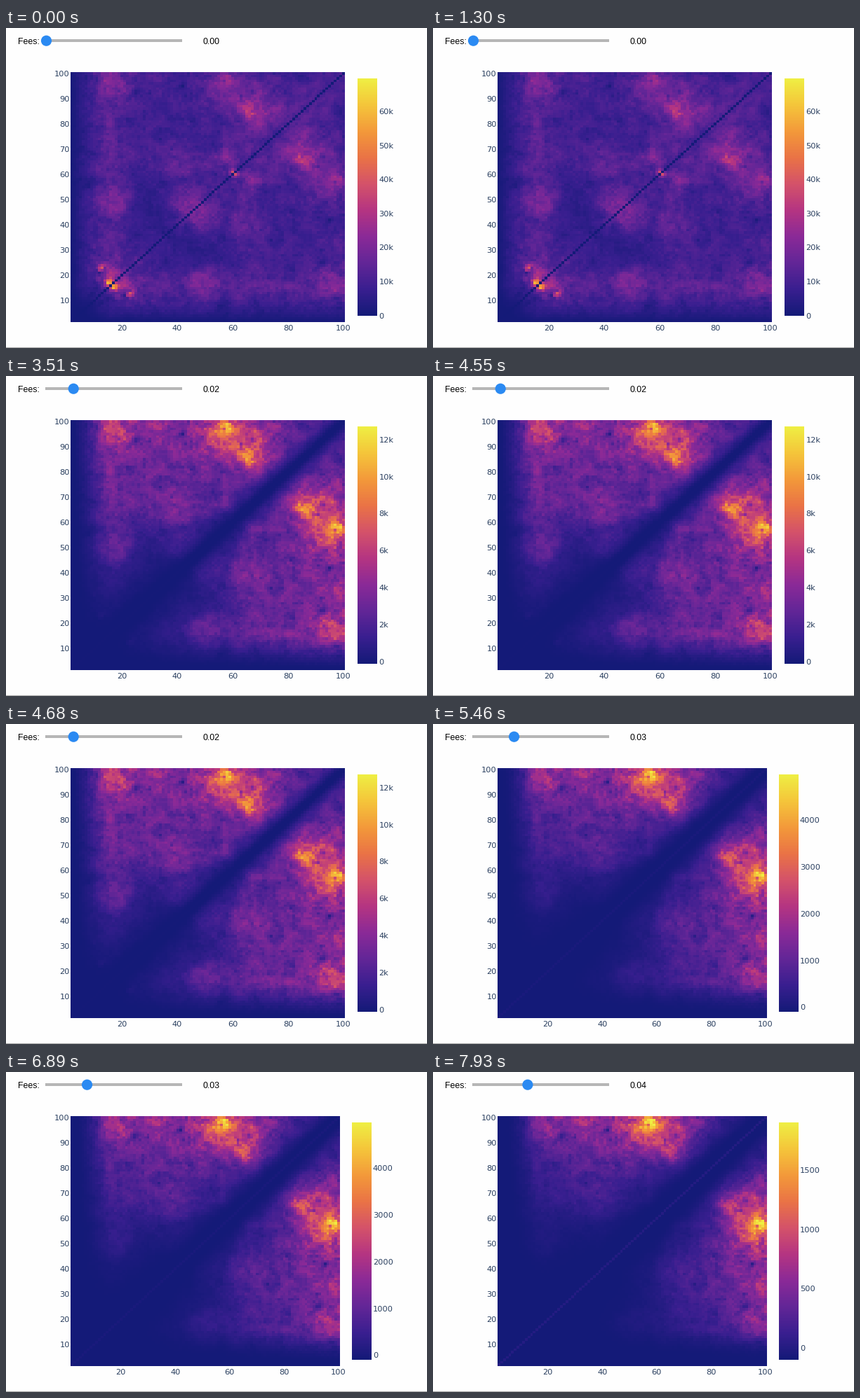
Animation of 600x457 px, one loop 8000 ms. Source, as a matplotlib script:

```python
import numpy as np
import matplotlib.pyplot as plt
from matplotlib.animation import FuncAnimation
from matplotlib.colors import LinearSegmentedColormap
from matplotlib.patches import Circle, Rectangle

W, H, DPI = 600, 457, 128
LOOP, STEP = 8000, 50
FIRST_MOVE, HOLD, LAG = 1450, 1820, 130
TOP, BOTTOM, LEFT = 63, 420, 92
BAR_TOP, BAR_BOTTOM = 72, 411
INK = "#2a3f5f"
LOSS = .1  # stake in thousands, the most that can be lost
PEAKS = [69.7, 12.7, 4.98, 1.9]

CMAP = LinearSegmentedColormap.from_list("heat", [
    "#141a78", "#3a1f90", "#632697", "#8b2a97", "#b53582",
    "#d4526a", "#ea7346", "#f3993a", "#f5c53a", "#efee43"])

# main hills: fast window, slow window, height in thousands, spread
HILLS = [
    (18, 97, 7, 5), (18, 50, 6, 4), (15, 20, 15, 4), (13, 23, 36, 1),
    (15.5, 17, 42, 1), (30, 45, -4, 9), (41, 64, 9, 4), (44, 47, 10, 5),
    (60, 61, 22, .8), (56, 66, 12, 3.5), (66, 86, 14, 2.5),
    (70, 85, 9, 6), (57, 98, 11, 2), (55, 97, 6, 8)]

rng = np.random.default_rng(11)
win = np.arange(2, 101)
N = len(win)


def smooth_noise(size):
    a = rng.normal(size=(N, N))
    for axis in (0, 1, 0, 1):
        a = sum(np.roll(a, k - size // 2, axis) for k in range(size))
    return a / a.std()


def bell(d, spread):
    return np.exp(-(d / spread) ** 2 / 2)


def build_model():
    """Return the gain of each window pair and its drag per fee step."""
    x, y = np.meshgrid(win, win)
    fast, slow = np.minimum(x, y), np.maximum(x, y)
    gain = 9 + 4 * bell(fast - 16, 4)
    for s, f, height, spread in HILLS:
        gain += height * bell(np.hypot(fast - s, slow - f), spread)
    noise = sum(.1 * smooth_noise(n) for n in (1, 2, 4, 7))
    gain *= 1 + noise[fast - 2, slow - 2]
    gain *= (1 - np.exp(-(fast / 6) ** 2)) * (1 - np.exp(-(slow / 13) ** 3))
    reach = np.sqrt(fast * np.maximum(slow - fast, .3))
    return np.maximum(gain, .2), (42 / reach) ** 1.15


GAIN, DRAG = build_model()


def surface(k):
    z = (GAIN + LOSS) * np.exp(-k * DRAG) - LOSS
    np.fill_diagonal(z, 0)
    return z


def nice_step(top):
    steps = (m * 10.0 ** e for e in range(-2, 3) for m in (1, 2, 5))
    return next(s for s in steps if top / s <= 7)


SURFACES = [surface(k) for k in range(len(PEAKS))]

fig = plt.figure(figsize=(W / DPI, H / DPI), dpi=DPI, facecolor="#fefefe")
ax = fig.add_axes([0, 0, 1, 1])


def label(x, y, text="", ha="center", size=11.4, font="DejaVu Sans", color=INK):
    return ax.text(x, y + 4, text, ha=ha, va="baseline", color=color,
                   fontsize=size * 72 / DPI, family=font)


def x_pos(v, right):
    return LEFT + (v - 1.5) * (right - LEFT) / N


heat = ax.imshow(SURFACES[0], cmap=CMAP, origin="lower", aspect="auto",
                 interpolation="nearest", extent=(LEFT, 483, BOTTOM, TOP))
bar = ax.imshow(np.linspace(0, 1, 256)[:, None], cmap=CMAP, origin="lower",
                aspect="auto", extent=(501, 528, BAR_BOTTOM, BAR_TOP))
ax.set_xlim(0, W)
ax.set_ylim(H, 0)
ax.axis("off")

for v in range(10, 101, 10):
    label(91, BOTTOM - (v - 1.5) * (BOTTOM - TOP) / N, str(v), "right")
x_ticks = range(20, 101, 20)
x_labels = [label(0, 428.5, str(v)) for v in x_ticks]
bar_labels = [label(0, 0, ha="left") for _ in range(7)]

label(17.5, 19, "Fees:", "left", 12.4, "Liberation Sans", "black")
readout = label(280.5, 19, "0.00", "left", 12.4, "Liberation Sans", "black")
ax.add_patch(Rectangle((56, 16.3), 195, 3.8, color="#b6b6b6", lw=0))
knob = ax.add_patch(Circle((57.5, 18.2), 7.6, color="#2b8af2", lw=0, zorder=3))
ax.add_patch(Rectangle((0, 456), W, 1, color="#a6a6a6", lw=0))


def show_heat(k):
    top = PEAKS[k]
    step = nice_step(top)
    in_k = step > 1
    # four-digit labels need a little more room beside the bar
    right, bar_x = (483, 501) if in_k else (476, 492.5)
    heat.set_data(SURFACES[k])
    heat.set_clim(-LOSS, top)
    heat.set_extent((LEFT, right, BOTTOM, TOP))
    bar.set_extent((bar_x, bar_x + 27.5, BAR_BOTTOM, BAR_TOP))
    for v, t in zip(x_ticks, x_labels):
        t.set_x(x_pos(v, right))
    scale = (BAR_BOTTOM - BAR_TOP) / (top + LOSS)
    for i, t in enumerate(bar_labels):
        v = i * step
        text = f"{v:.0f}k" if in_k and v else f"{v * 1000:.0f}"
        t.set_text(text if v <= top else "")
        t.set_position((bar_x + 30.3, BAR_BOTTOM - (v + LOSS) * scale + 4))


def fee_at(now):
    return max(0, (now - FIRST_MOVE) // HOLD + 1)


def update(i):
    now = i * STEP
    fee = fee_at(now)
    knob.center = (57.5 + 19.35 * fee, 18.2)
    readout.set_text(f"{fee / 100:.2f}")
    show_heat(max(0, fee_at(now - LAG) - 1))
    return []


anim = FuncAnimation(fig, update, frames=LOOP // STEP, interval=STEP,
                     repeat=True, repeat_delay=0, blit=False)
plt.show()
```
